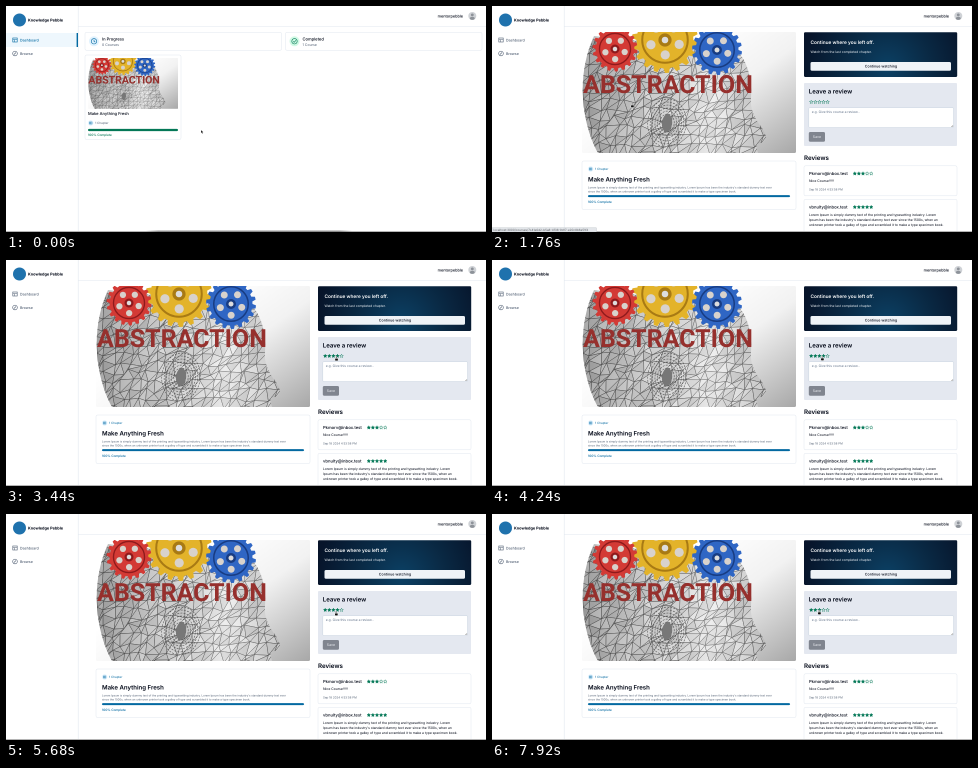
An HTML page with a canvas that plays this animation: 480x226 px, repeating every 8 s.

```html
<!DOCTYPE html>
<html lang="en">
<head>
<meta charset="utf-8">
<title>Course review</title>
<style>
  html, body { margin: 0; width: 100%; height: 100%; overflow: hidden; background: #fff; }
  canvas { display: block; width: 480px; height: 226px; }
</style>
</head>
<body>
<canvas id="stage"></canvas>
<script>
const LOOP = 8000, W = 480, H = 226;
const OPEN_AT = 1280, HOVER_AT = 440, LEAVE_AT = 2000;
const INK = '#020817', GRAY = '#526074', LINE = '#e2e8f0';
const BLUE = '#0369a1', PALE = '#e0f2fe', GREEN = '#047857';
const COURSE = 'Make Anything Fresh';

// pointer stops: time, x, y
const STOPS = [
  [0, 195, 124], [80, 195, 124], [720, 140, 98], [1960, 140, 98],
  [2560, 333, 104], [2880, 333, 104], [3520, 330, 97], [4320, 330, 97],
  [4800, 335.5, 99], [5200, 335.5, 99], [6240, 323, 97], [6640, 323, 97],
  [7600, 327, 97], [8000, 327, 97]
];

// drawn at double size and scaled down for soft small type
const canvas = document.getElementById('stage');
const zoom = 2 * (window.devicePixelRatio || 1);
canvas.width = W * zoom;
canvas.height = H * zoom;
const c = canvas.getContext('2d');
c.textRendering = 'geometricPrecision';

function text(s, x, y, size, color = INK, weight = 400, align = 'left') {
  c.font = `${weight} ${size}px Inter, sans-serif`;
  c.fillStyle = color;
  c.textAlign = align;
  c.fillText(s, x, y);
}

function box(x, y, w, h, fill, stroke, r = 1.5) {
  c.beginPath();
  c.roundRect(x, y, w, h, r);
  if (fill) { c.fillStyle = fill; c.fill(); }
  if (stroke) { c.strokeStyle = stroke; c.lineWidth = 0.5; c.stroke(); }
}

function disc(x, y, r, fill) {
  c.beginPath();
  c.arc(x, y, r, 0, Math.PI * 2);
  c.fillStyle = fill;
  c.fill();
}

function line(color, width, ...p) {
  c.beginPath();
  for (let i = 0; i < p.length; i += 2) c.lineTo(p[i], p[i + 1]);
  c.strokeStyle = color;
  c.lineWidth = width;
  c.stroke();
}

function ring(x, y, r, color, width = 0.6) {
  c.beginPath();
  c.arc(x, y, r, 0, Math.PI * 2);
  c.strokeStyle = color;
  c.lineWidth = width;
  c.stroke();
}

function star(x, y, full) {
  c.beginPath();
  for (let i = 0; i < 10; i++) {
    const a = i * Math.PI / 5 - Math.PI / 2, r = i % 2 ? 0.85 : 1.85;
    c.lineTo(x + r * Math.cos(a), y + r * Math.sin(a));
  }
  c.closePath();
  c.strokeStyle = c.fillStyle = GREEN;
  c.lineWidth = 0.4;
  if (full) c.fill();
  c.stroke();
}

function stars(x, y, count) {
  for (let i = 0; i < 5; i++) star(x + i * 4.1, y, i < count);
}

function random(seed) {
  return () => (seed = (seed * 16807) % 2147483647) / 2147483647;
}

function gear(x, y, r, color, dark) {
  const teeth = 18, step = Math.PI * 2 / teeth;
  c.beginPath();
  for (let i = 0; i < teeth; i++) {
    [[0, 0.86], [0.16, 1], [0.5, 1], [0.66, 0.86]].forEach(([k, s]) => {
      const a = (i + k) * step;
      c.lineTo(x + r * s * Math.cos(a), y + r * s * Math.sin(a));
    });
  }
  c.closePath();
  c.fillStyle = color;
  c.fill();
  ring(x, y, r * 0.69, dark, r * 0.06);
  for (let i = 0; i < 5; i++) {
    const a = i * Math.PI * 0.4 + 0.3;
    disc(x + r * 0.45 * Math.cos(a), y + r * 0.45 * Math.sin(a), r * 0.14, '#d8d2cc');
  }
  disc(x, y, r * 0.2, dark);
  disc(x, y, r * 0.1, '#ddd');
}

function mesh() {
  const rnd = random(77), cols = 22, rows = 14, grid = [];
  for (let j = 0; j <= rows; j++)
    for (let i = 0; i <= cols; i++)
      grid.push([i * 9 - 5 + rnd() * 7, j * 9 + 2 + rnd() * 7]);
  const tri = (...ids) => {
    c.beginPath();
    ids.forEach(n => c.lineTo(...grid[n]));
    c.closePath();
    const v = 205 + Math.floor(rnd() * 35);
    c.fillStyle = `rgb(${v},${v},${v})`;
    c.strokeStyle = '#484848';
    c.lineWidth = 0.45;
    c.fill();
    c.stroke();
  };
  for (let j = 0; j < rows; j++)
    for (let i = 0; i < cols; i++) {
      const n = j * (cols + 1) + i, m = n + cols + 1;
      tri(n, n + 1, m);
      tri(n + 1, m, m + 1);
    }
}

function ear(x, y) {
  c.strokeStyle = '#555';
  c.lineWidth = 0.6;
  c.setLineDash([2, 1.2]);
  for (let r = 6; r <= 24; r += 3) {
    c.beginPath();
    c.ellipse(x, y, r * 0.8, r, 0.12, 0, Math.PI * 2);
    c.stroke();
  }
  c.setLineDash([]);
  c.beginPath();
  c.ellipse(x, y, 5, 9, 0.12, 0, Math.PI * 2);
  c.fillStyle = '#777';
  c.fill();
}

// course picture on a 214 x 121 field
function picture(x, y, scale) {
  c.save();
  c.translate(x, y);
  c.scale(scale, scale);
  c.beginPath();
  c.roundRect(0, 0, 214, 121, 1.5);
  c.clip();
  const back = c.createLinearGradient(130, 0, 214, 121);
  back.addColorStop(0, '#fff');
  back.addColorStop(0.4, '#f2f2f2');
  back.addColorStop(1, '#a8a8a8');
  c.fillStyle = back;
  c.fillRect(0, 0, 214, 121);

  c.save();
  c.beginPath();
  c.moveTo(16, 121);
  c.bezierCurveTo(2, 96, -8, 48, 12, 4);
  c.lineTo(156, 20);
  c.bezierCurveTo(167, 32, 170, 50, 169, 66);
  c.bezierCurveTo(168, 77, 172, 84, 177, 92);
  c.quadraticCurveTo(184, 101, 184, 106);
  c.quadraticCurveTo(182, 111, 175, 112);
  c.quadraticCurveTo(174, 116, 176, 121);
  c.closePath();
  c.clip();
  mesh();
  const shade = c.createLinearGradient(0, 0, 184, 0);
  shade.addColorStop(0, 'rgba(50,50,50,.36)');
  shade.addColorStop(0.45, 'rgba(120,120,120,.12)');
  shade.addColorStop(0.7, 'rgba(255,255,255,.25)');
  shade.addColorStop(1, 'rgba(90,90,90,.2)');
  c.fillStyle = shade;
  c.fillRect(0, 0, 190, 121);
  ear(85, 91);
  c.restore();

  gear(83, 8, 33, '#e3b32a', '#a87a14');
  gear(33, 17, 22.5, '#d33a35', '#8e1a1c');
  gear(135, 18, 25, '#2f66c4', '#183c82');
  c.font = '700 25px Roboto, sans-serif';
  c.textAlign = 'left';
  c.fillStyle = '#96302d';
  c.fillText('ABSTRACTION', 1, 61);
  c.restore();
}

function clock(x, y, r, color) {
  ring(x, y, r, color);
  line(color, 0.6, x, y - r * 0.6, x, y, x + r * 0.45, y + r * 0.3);
}

function chapter(x, y, color) {
  disc(x, y, 2.7, PALE);
  c.strokeStyle = BLUE;
  c.lineWidth = 0.4;
  c.strokeRect(x - 1.3, y - 1, 2.6, 2);
  line(BLUE, 0.4, x, y - 1, x, y + 1);
  text('1 Chapter', x + 4.4, y + 1.1, 3, color);
}

function frame(dashboard) {
  c.fillStyle = '#fff';
  c.fillRect(0, 0, W, H);
  line(LINE, 0.6, 72.2, 0, 72.2, H);
  line(LINE, 0.6, 72, 20.5, W, 20.5);
  disc(13.5, 14, 6.5, '#1f72ad');
  text('Knowledge Pebble', 22, 15.4, 3.85, INK, 700);

  const tint = dashboard ? BLUE : GRAY;
  if (dashboard) {
    c.fillStyle = '#eef7fd';
    c.fillRect(0, 27, 72, 14);
    c.fillStyle = BLUE;
    c.fillRect(70.6, 27, 1.4, 14);
  }
  c.strokeStyle = tint;
  c.lineWidth = 0.6;
  c.strokeRect(6.8, 32, 4.4, 4);
  line(tint, 0.5, 6.8, 33.6, 11.2, 33.6);
  line(tint, 0.5, 8.5, 33.6, 8.5, 36);
  text('Dashboard', 14, 35.3, 3.6, tint, 500);
  ring(9, 47.5, 2.3, GRAY);
  line(GRAY, 0.6, 8, 48.5, 10, 46.5);
  text('Browse', 14, 48.9, 3.6, GRAY, 500);

  text('mentorpebble', 457, 11.4, 3.8, INK, 500, 'right');
  disc(466.3, 10, 4, '#cfd2d6');
  disc(466.3, 8.9, 1.4, '#8d9299');
  c.beginPath();
  c.ellipse(466.3, 12.4, 2.4, 1.5, 0, 0, Math.PI * 2);
  c.fill();
}

function summary(x, title, count, done) {
  const color = done ? GREEN : BLUE;
  box(x, 26.3, 196.5, 18, '#fff', LINE);
  disc(x + 9, 35.3, 5, done ? '#d1fae5' : PALE);
  if (done) {
    ring(x + 9, 35.3, 2.7, color);
    line(color, 0.6, x + 7.7, 35.3, x + 8.7, 36.3, x + 10.5, 34.3);
  } else clock(x + 9, 35.3, 2.7, color);
  text(title, x + 17, 34.7, 4.1, INK, 500);
  text(count, x + 17, 39.9, 3.5, GRAY);
}

function dashboardPage() {
  summary(79, 'In Progress', '0 Courses', false);
  summary(279.5, 'Completed', '1 Course', true);
  box(79, 49, 96, 84.5, '#fff', LINE);
  picture(82, 52, 90 / 214);
  text(COURSE, 82, 109.2, 4.05, INK, 500);
  chapter(84.7, 117, GRAY);
  box(82, 122.9, 90, 2.2, GREEN, null, 1.1);
  text('100% Complete', 82, 130, 3.15, GREEN, 500);
}

function review(y, h, mail, count) {
  box(312, y, 153, h, '#fff', LINE);
  text(mail, 317, y + 9.3, 4.15, INK, 500);
  stars(362.8, y + 7.8, count);
}

function resumeCard() {
  const night = c.createRadialGradient(395, 62, 0, 395, 62, 85);
  night.addColorStop(0, '#0c4165');
  night.addColorStop(0.5, '#0a2a45');
  night.addColorStop(1, '#07142a');
  box(312, 26.2, 153.2, 44.8, night, null, 1.2);
  text('Continue where you left off.', 318.5, 38, 4.75, '#fff', 600);
  text('Watch from the last completed chapter.', 318.5, 47.2, 3.3, '#eef2f6');
  box(318.5, 56, 140.5, 8.8, '#eff3f7');
  text('Continue watching', 389, 61.7, 3.6, INK, 500, 'center');
}

function reviewForm(rating) {
  box(312, 77, 153, 63, '#e4e8f0', null, 1);
  text('Leave a review', 316.8, 87.6, 6.05, INK, 600);
  stars(319.2, 96, rating);
  box(316.8, 101.7, 144.7, 19.8, '#fff', '#cbd5e1', 1);
  text('e.g. Give this course a review...', 319.8, 107.2, 3.3, '#64748b');
  line('#555', 0.4, 459.2, 121, 461, 119.2);
  line('#555', 0.4, 460.2, 121, 461, 120.2);
  box(316.8, 126, 16.2, 9.8, '#80858f');
  text('Save', 324.9, 132.1, 3.5, '#e0e3e8', 500, 'center');
}

function coursePage(rating) {
  picture(90, 26, 1);
  box(90, 155, 214, 48.5, '#fff', LINE);
  chapter(98.6, 163, BLUE);
  text(COURSE, 96, 175.6, 6.05, INK, 600);
  text("Lorem Ipsum is simply dummy text of the printing and typesetting industry. Lorem Ipsum has been the industry's standard dummy text ever", 96, 182.5, 2.8, GRAY);
  text('since the 1500s, when an unknown printer took a galley of type and scrambled it to make a type specimen book.', 96, 186.3, 2.8, GRAY);
  box(96, 189.1, 202, 2, BLUE, null, 1);
  text('100% Complete', 96, 196.8, 3.15, BLUE, 500);

  resumeCard();
  reviewForm(rating);
  text('Reviews', 312, 154.2, 6.2, INK, 600);
  review(159.8, 30, 'Pkmorv@inbox.test', 3);
  text('Nice Course!!!!!', 317, 176.2, 3.4, INK);
  text('Sep 18 2024 4:53:58 PM', 317, 184.6, 2.9, GRAY);
  review(193.3, 40, 'vbnulty@inbox.test', 5);
  text('Lorem Ipsum is simply dummy text of the printing and typesetting industry. Lorem', 317, 210, 3.3, INK);
  text("Ipsum has been the industry's standard dummy text ever since the 1500s, when an", 317, 215, 3.3, INK);
  text('unknown printer took a galley of type and scrambled it to make a type specimen book.', 317, 220, 3.3, INK);
}

function pointer(t) {
  const i = Math.max(0, STOPS.findIndex(s => s[0] > t) - 1);
  const [t0, x0, y0] = STOPS[i], [t1, x1, y1] = STOPS[i + 1];
  const k = (t - t0) / (t1 - t0), e = k * k * (3 - 2 * k);
  return [x0 + (x1 - x0) * e, y0 + (y1 - y0) * e];
}

function drawPointer(x, y, kind) {
  c.save();
  c.translate(x, y);
  if (kind === 'text') {
    line('#333', 0.5, -0.8, -2, 0, -1.7, 0.8, -2);
    line('#333', 0.5, 0, -1.8, 0, 2);
    line('#333', 0.5, -0.8, 2.2, 0, 1.9, 0.8, 2.2);
  } else if (kind === 'hand') {
    box(-0.5, -1, 1.2, 3.5, '#111', '#fff', 0.5);
    box(-1.2, 1, 3.2, 2.6, '#111', '#fff', 0.8);
  } else {
    c.beginPath();
    c.moveTo(0, 0);
    [[0, 3.2], [0.8, 2.5], [1.4, 3.8], [2, 3.5], [1.4, 2.3], [2.4, 2.3]].forEach(p => c.lineTo(...p));
    c.closePath();
    c.fillStyle = '#111';
    c.fill();
    c.strokeStyle = 'rgba(255,255,255,.8)';
    c.lineWidth = 0.25;
    c.stroke();
  }
  c.restore();
}

function dockShadow() {
  const glow = c.createLinearGradient(140, 0, 346, 0);
  glow.addColorStop(0, 'rgba(90,90,90,0)');
  glow.addColorStop(0.06, 'rgba(90,90,90,.45)');
  glow.addColorStop(0.94, 'rgba(90,90,90,.45)');
  glow.addColorStop(1, 'rgba(90,90,90,0)');
  c.fillStyle = glow;
  c.fillRect(140, 224.3, 206, 1.7);
}

function draw(t) {
  c.setTransform(zoom, 0, 0, zoom, 0, 0);
  const home = t < OPEN_AT;
  const [x, y] = pointer(t);
  const onStars = !home && y > 93 && y < 98.8 && x >= 317 && x < 337.5;
  const linked = t >= HOVER_AT && t < LEAVE_AT;
  const onField = !home && x > 317 && y > 101.7;

  frame(home);
  if (home) dashboardPage();
  else coursePage(onStars ? Math.floor((x - 317) / 4.1) + 1 : 0);
  c.fillStyle = '#b4b4b4';
  c.fillRect(0, 225, W, 1);
  if (t < HOVER_AT) dockShadow();
  if (linked) {
    box(0, 221.7, 104.5, 4.3, '#e3e6ea', '#c9cdd2', 0.5);
    text('localhost:3000/courses/7c41e0d2-b5a8-4f36-9d17-e20c8b6a51f4', 1.5, 224.9, 3, '#5f6368');
  }
  drawPointer(x, y, linked || onStars ? 'hand' : onField ? 'text' : 'arrow');
}

const start = performance.now();
function tick() {
  draw((performance.now() - start) % LOOP);
  requestAnimationFrame(tick);
}
tick();
</script>
</body>
</html>
```
